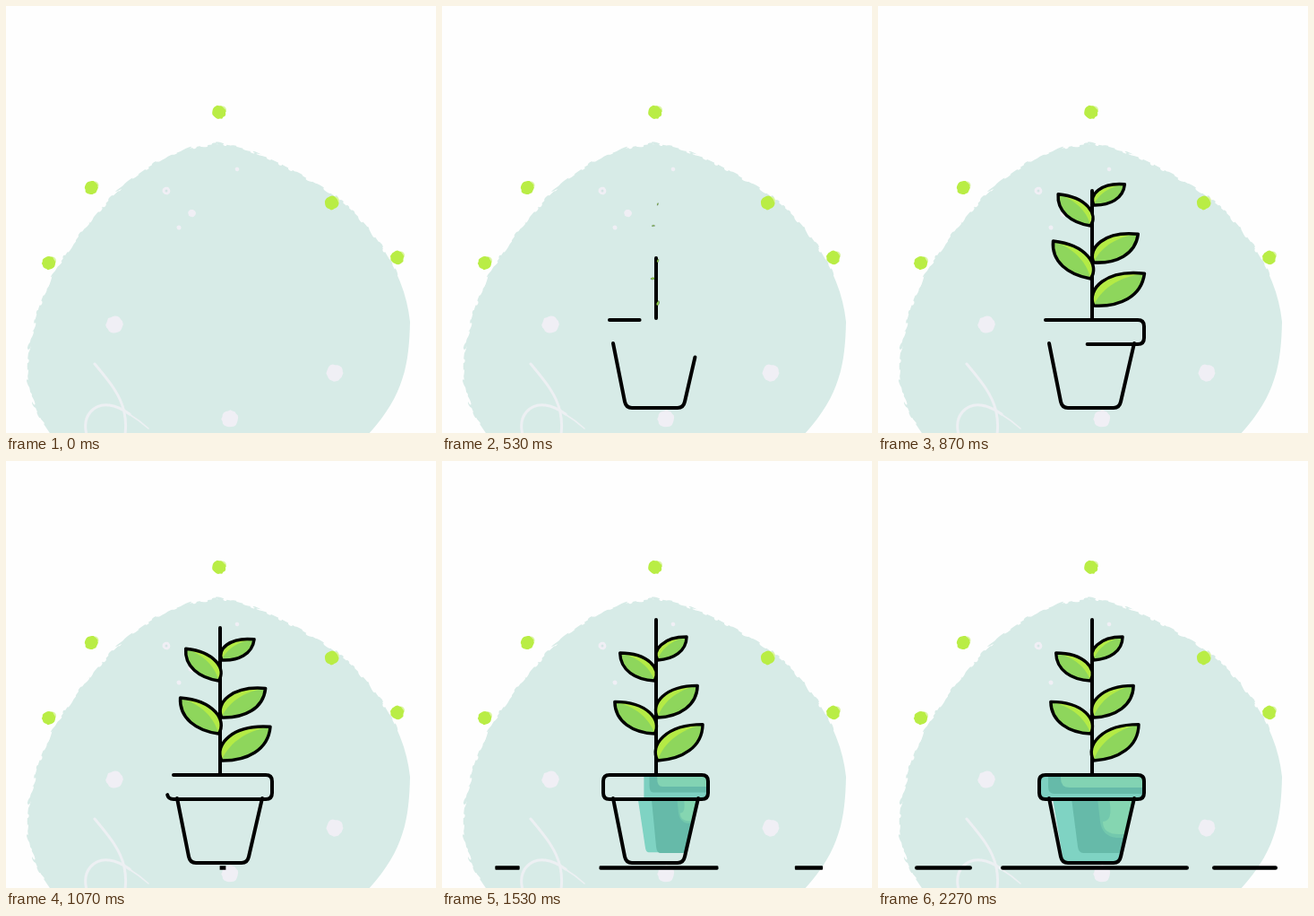
Write an HTML page that moves like this. It is 480 px wide and 476 px high and loops after 2340 ms.

```html
<!DOCTYPE html>
<html lang="en">
<head>
<meta charset="utf-8">
<title>Growing plant</title>
<style>
  html, body { margin: 0; width: 100%; height: 100%; overflow: hidden; background: #fefefe; }
  svg { display: block; width: 100%; height: 100%; }
  .ink { fill: none; stroke: #000; stroke-width: 4; stroke-linecap: round; stroke-linejoin: round; }
  .swirl { fill: none; stroke: #edf0f3; stroke-linecap: round; }
</style>
</head>
<body>
<svg viewBox="0 0 480 476">
  <defs>
    <clipPath id="potClip"><path d="M191 376L204 441Q205.500 448 212 448H263Q269.500 448 271 441L286 376Z"/></clipPath>
    <clipPath id="rimClip"><rect x="180" y="350" width="117" height="27" rx="7"/></clipPath>
  </defs>
  <g id="scene"></g>
  <path class="swirl" stroke-width="3" d="M99 399C114 417 128 433 132 453C134 462 134 469 133 477"/>
  <path class="swirl" stroke-width="3" d="M90 478C84 455 100 443 115 445C124 446 131 450 138 455"/>
  <path class="swirl" stroke-width="1.500" d="M136 454Q149 462 159 471"/>
  <g id="ground"></g>
  <g clip-path="url(#potClip)">
    <path id="potBase" fill="#7fd3c3" d="M195 376H286L271 448H211Q207 448 206 441Z"/>
    <path id="potDark" fill="#66baa9" d="M216 376H286L278 437H229Q224 437 223 430Z"/>
    <g id="potLight">
      <path fill="#73c8ad" d="M245 376H286V420H266Q250 418 248 402Z"/>
      <path fill="#85d6b1" d="M258 376H286V416H269Q251 416 251 402Q263 402 258 376Z"/>
    </g>
  </g>
  <g clip-path="url(#rimClip)">
    <g id="rimFill">
      <path fill="#7dd0c1" d="M180 350H298V378H180Z"/>
      <path fill="#66baa9" d="M190 350H298V371H197Q190 371 190 363Z"/>
      <path fill="#82d3b3" d="M204 350H298V364H214Q204 364 204 354Z"/>
    </g>
  </g>
  <path id="stem" class="ink" d="M239 348V177"/>
  <path id="pot" class="ink" d="M191 376L204 441Q205.500 448 212 448H263Q269.500 448 271 441L286 376"/>
  <path id="rim" class="ink" d="M187 350H290Q297 350 297 357V370Q297 377 290 377H187Q180 377 180 370V357Q180 350 187 350"/>
  <g id="leaves"></g>
</svg>
<script>
const LOOP = 2340, TICKS = 35;
const $ = id => document.getElementById(id);

function add(parent, tag, attrs) {
  const el = document.createElementNS('http://www.w3.org/2000/svg', tag);
  for (const k in attrs) el.setAttribute(k, attrs[k]);
  return parent.appendChild(el);
}

function show(el, on) { el.style.display = on ? '' : 'none'; }

let seed = 11;
const rnd = () => (seed = (seed * 16807) % 2147483647) / 2147483647;

// Progress 0..1 from tick a to tick b; a higher power slows the end more
function easeOut(t, a, b, power) {
  const u = Math.min(1, Math.max(0, (t - a) / (b - a)));
  return 1 - (1 - u) ** power;
}

// Backdrop with a dry-brush edge
function backdrop(g) {
  const blob = add(g, 'path', {
    fill: '#d7ebe7',
    d: 'M52 480C32 455 22 425 24 395C29 352 42 312 64 281C86 248 112 215 142 192'
      + 'C172 168 206 154 240 154C275 157 312 178 346 198C374 215 398 236 416 263'
      + 'C436 292 448 322 451 352C450 400 444 436 402 480Z'
  });
  const end = (blob.getTotalLength() - 350) * 0.78;
  for (let s = 20; s < end; s += 4 + rnd() * 12) {
    const a = blob.getPointAtLength(s), b = blob.getPointAtLength(s + 2);
    const turn = Math.atan2(b.y - a.y, b.x - a.x) * 180 / Math.PI + (rnd() - 0.5) * 24;
    add(g, 'ellipse', {
      rx: 2 + rnd() * rnd() * 8, ry: 0.7 + rnd() * 1.2,
      fill: rnd() < 0.45 ? '#d7ebe7' : '#fefefe',
      transform: `translate(${a.x} ${a.y}) rotate(${turn})`
    });
  }
}

function roughDot(g, x, y, r, fill) {
  const pts = [];
  for (let a = 0; a < Math.PI * 2; a += 0.28) {
    const q = r * (0.93 + rnd() * 0.14);
    pts.push([x + q * Math.cos(a), y + q * Math.sin(a)]);
  }
  add(g, 'polygon', { points: pts.join(' '), fill });
}

function dots(g) {
  for (const [x, y] of [[238, 118], [95.5, 202], [364, 219], [437, 280], [48, 286]]) {
    add(g, 'circle', { cx: x + 3.5, cy: y - 2, r: 4.5, fill: '#dcf5a6' });
    roughDot(g, x - 0.3, y + 0.5, 7.5, '#b9ed45');
  }
  for (const [x, y, r] of [[121, 355, 9.3], [367, 409, 9.3], [250, 460, 9.3],
    [179, 206, 4.3], [207.5, 231, 4.2], [193, 247, 2.5], [258, 182, 2.3]])
    roughDot(g, x, y, r, '#f0eff5');
  add(g, 'circle', { cx: 179, cy: 206, r: 1.5, fill: '#d5e6e5' });
}

backdrop($('scene'));
dots($('scene'));

// Lines that draw themselves: start tick, end tick, easing power
const lines = [['pot', 0.3, 11, 2], ['stem', 5.4, 22.4, 3], ['rim', 7.2, 20, 2]].map(([id, a, b, power]) => {
  const el = $(id), full = el.getTotalLength();
  return t => {
    const n = full * easeOut(t, a, b, power);
    show(el, n > 0);
    el.setAttribute('stroke-dasharray', n + ' 999');
  };
});

// Ground bars widen from their centres
const bars = [[242, 210, 15.7], [73, 64, 19.4], [409.5, 73, 19.4]].map(([x, full, start]) => {
  const el = add($('ground'), 'rect', { y: 451.2, height: 4.6 });
  return t => {
    const p = easeOut(t, start, 34.2, 2);
    show(el, p > 0);
    el.setAttribute('x', x - full * p / 2);
    el.setAttribute('width', full * p);
    el.setAttribute('rx', 2.3 * p);
  };
});

// Leaves alternate sides going up; each shoots past its pose, then settles
const UPPER = 'M0 0C.05 -.3 .5 -.4 1 0', LOWER = 'C.75 .3 .35 .25 0 0Z';
const leaves = [[334, 64.5], [304, 57], [286, 57], [245, 49.5], [222, 41.5]].map(([y, len], i) => {
  const side = i % 2 ? -1 : 1, x = 239 + side * 1.7, peak = 13 + 0.6 * i;
  const el = add($('leaves'), 'g', {});
  add(el, 'path', { d: UPPER + LOWER, fill: '#8ed65c' });
  add(el, 'path', { d: UPPER + 'C.5 -.24 .15 -.1 0 0Z', fill: '#b4eb45' });
  add(el, 'path', { d: UPPER + LOWER, class: 'ink', style: `stroke-width:${3.4 / len}` });
  return t => {
    const p = easeOut(t, 7.85, peak, 3);
    const rest = Math.min(1, Math.max(0, (t - peak) / (20 - peak)));
    const over = (1 + Math.cos(Math.PI * rest)) / 2;
    const size = len * p * (1 + 0.04 * over), turn = 6.5 * over - 50 * (1 - p);
    show(el, p > 0);
    el.setAttribute('transform',
      `translate(${x} ${y}) rotate(${turn}) scale(${side} 1) rotate(-38.7) scale(${size})`);
  };
});

// Colour fills spread from the top right corner
const fills = [
  ['potBase', 286, 376, 16.2, 35, 1.13],
  ['potDark', 286, 376, 18.5, 30.8, 1.4],
  ['potLight', 286, 376, 20, 32, 1.1],
  ['rimFill', 298, 350, 20, 31, 1.5]
].map(([id, x, y, a, b, tall]) => t => {
  const s = easeOut(t, a, b, 3);
  show($(id), s > 0);
  $(id).setAttribute('transform',
    `translate(${x} ${y}) scale(${s} ${Math.min(1, s * tall)}) translate(${-x} ${-y})`);
});

const parts = [...lines, ...bars, ...leaves, ...fills];

// Motion advances in even ticks, about fifteen a second
const began = performance.now();
function frame() {
  const ms = (performance.now() - began) % LOOP;
  const tick = Math.min(TICKS - 1, Math.floor(ms * TICKS / LOOP + 0.15));
  for (const part of parts) part(tick);
  requestAnimationFrame(frame);
}
frame();
</script>
</body>
</html>
```
